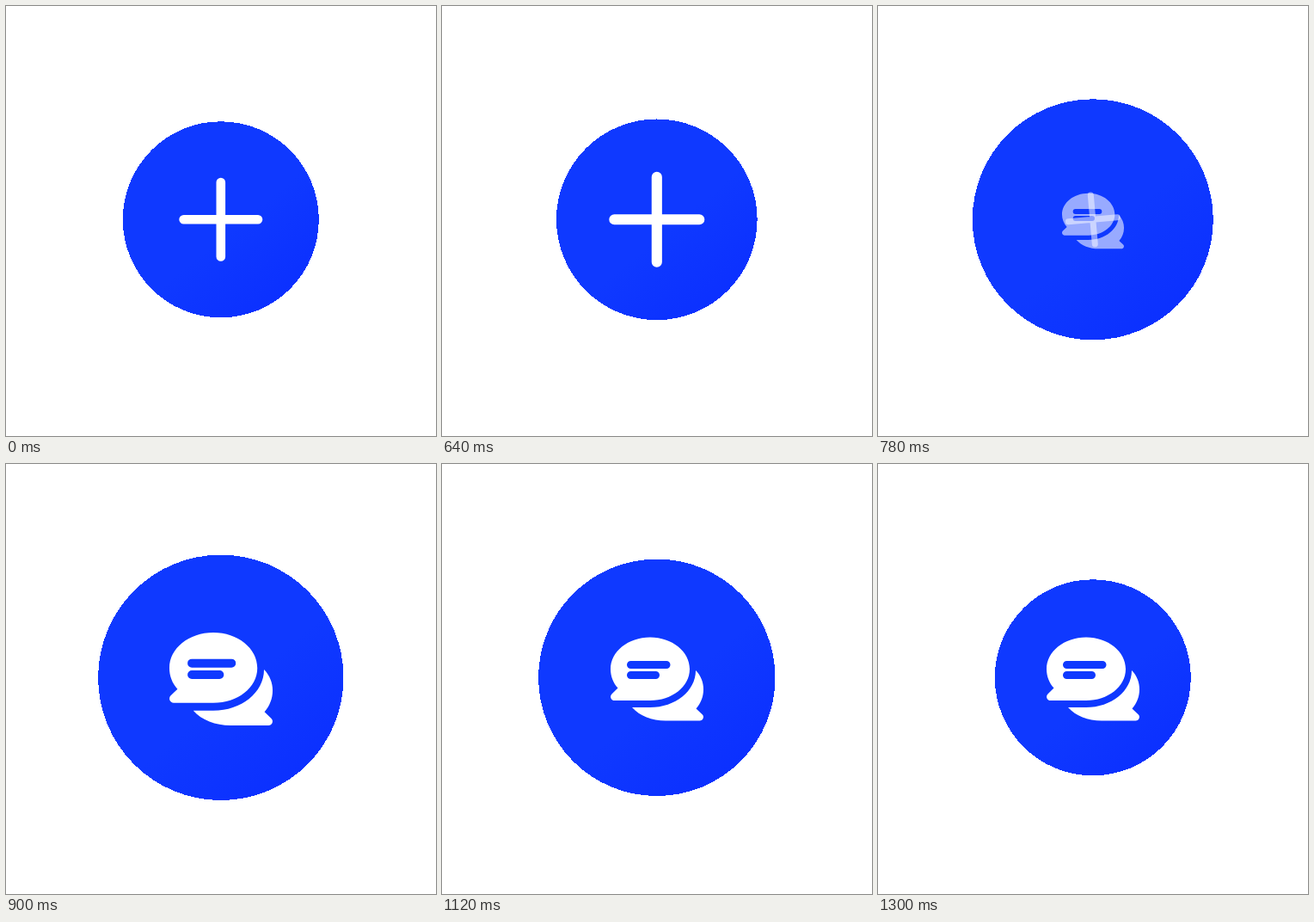
Animation, 500 px wide and 500 px high, one loop 1800 ms. Source, as an HTML page:

```html
<!DOCTYPE html>
<html lang="en">
<head>
<meta charset="utf-8">
<title>Chat button</title>
<style>
  html, body { margin: 0; width: 100%; height: 100%; overflow: hidden; background: #fff; }
  svg { display: block; width: 100%; height: 100%; }
</style>
</head>
<body>
<svg viewBox="0 0 500 500">
  <defs>
    <linearGradient id="blue" x1="0.15" y1="0.1" x2="0.85" y2="0.95">
      <stop offset="0" stop-color="#0f39ff"/>
      <stop offset="0.55" stop-color="#0f39ff"/>
      <stop offset="1" stop-color="#0b2fff"/>
    </linearGradient>
  </defs>
  <circle id="disc" cx="249.8" cy="248.3" r="114" fill="url(#blue)" shape-rendering="crispEdges"/>
  <g id="chat" fill="#fff">
    <path d="M242 201.5 C267.4 201.5 288 218 288 238.5 C288 259 267.4 275 242 275 H200.5
             C196.6 275 194.6 270.2 197.4 267.4 L204.5 260.5 C199 254.5 196 246.5 196 238.5
             C196 218 216.6 201.5 242 201.5 Z"/>
    <path d="M295 240 C301 246 304 254 304 262 C304 270.5 301 278 295.5 284.5 L302.7 291.3
             C305.4 294 303.4 298.5 299.6 298.5 H260 C244 298.5 230 293 221 283 H242
             C271.3 283 295 264 295 240 Z"/>
    <path d="M219.5 233.5 H261 M219.5 245.5 H248.5" stroke="#0f39ff" stroke-width="9" stroke-linecap="round"/>
  </g>
  <path id="plus" d="M-43.2 0 H43.2 M0 -43.2 V43.2" stroke="#fff" stroke-width="10.6" stroke-linecap="round"/>
</svg>
<script>
  const LOOP = 1800, STEP = 20;
  const disc = document.getElementById('disc');
  const chat = document.getElementById('chat');
  const plus = document.getElementById('plus');

  // Smooth progress from 0 to 1 between two times
  function ease(t, from, to) {
    const u = Math.min(1, Math.max(0, (t - from) / (to - from)));
    return u * u * (3 - 2 * u);
  }

  function draw(t) {
    const swell = ease(t, 596, 823) - ease(t, 1055, 1300);
    disc.setAttribute('r', 114 + 28.7 * swell);

    const out = ease(t, 705, 855);
    const plusScale = 1 + 0.22 * ease(t, 540, 705) - 1.12 * out;
    plus.setAttribute('transform', `translate(249.8 248.3) rotate(${-10 * out}) scale(${plusScale})`);
    plus.setAttribute('opacity', 1 - out);

    const show = ease(t, 700, 846);
    const chatScale = 1.167 * show - 0.167 * ease(t, 846, 986);
    chat.setAttribute('transform', `translate(250 250) scale(${chatScale}) translate(-250 -250)`);
    chat.setAttribute('opacity', show);
  }

  const start = performance.now();
  function tick() {
    const t = (performance.now() - start) % LOOP;
    draw(Math.floor(t / STEP) * STEP);
    requestAnimationFrame(tick);
  }
  draw(0);
  requestAnimationFrame(tick);
</script>
</body>
</html>
```
